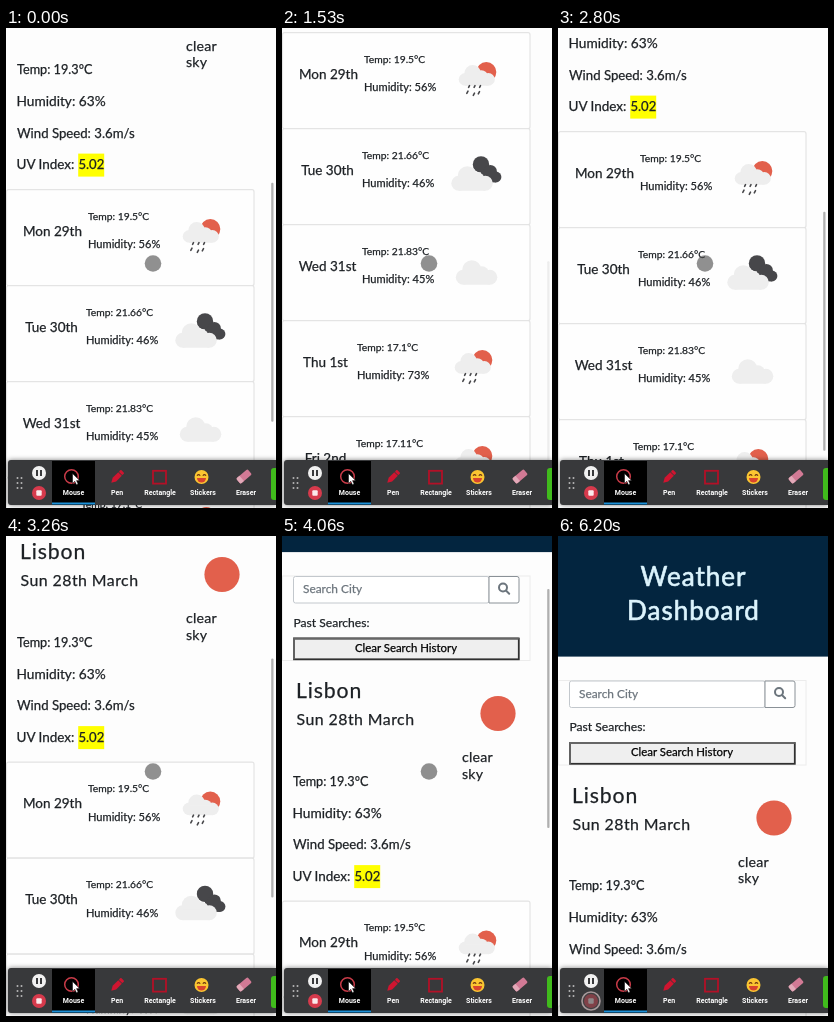
An HTML page for the animation above (6660 ms loop, 270 px wide and 480 px high).

```html
<!DOCTYPE html>
<html lang="en">
<head>
<meta charset="utf-8">
<title>Weather Dashboard</title>
<style>
  html, body { margin: 0; width: 100%; height: 100%; overflow: hidden; background: #fdfdfd; }
  svg { display: block; width: 100vw; height: 100vh; }
  text {
    font-family: Lato, "Open Sans", sans-serif; white-space: pre;
    color: #1d2125; fill: currentColor; stroke: currentColor; stroke-width: .25; stroke-linejoin: round;
  }
  .mid { text-anchor: middle; }
  .title { font-size: 26px; letter-spacing: 1px; color: #dcf4fd; stroke-width: .7; text-anchor: middle; }
  .sky { font-size: 14.2px; letter-spacing: .2px; }
  .day { font-size: 13.5px; text-anchor: middle; }
  .temp { font-size: 10.3px; }
  .hum { font-size: 11.1px; }
  .card { fill: #fefefe; stroke: #e4e4e4; stroke-width: 1.2; }
  .cloud { fill: #eeeeee; }
  .dark { fill: #47474a; }
  .sun { fill: #e2604c; }
  .rain { stroke: #47474a; stroke-width: 1.6; stroke-linecap: round; }
  #bar { filter: drop-shadow(0 0 2.5px rgba(0, 0, 0, .5)); }
  #bar text { font: 700 7px Roboto, Arial, sans-serif; color: #fff; stroke: none; text-anchor: middle; }
</style>
</head>
<body>
<svg viewBox="0 0 270 480" xmlns="http://www.w3.org/2000/svg">
  <defs>
    <g id="cloud">
      <circle cx="-5" cy="-15" r="9.5"/>
      <circle cx="5" cy="-11" r="7.5"/>
      <circle cx="-13.5" cy="-7.5" r="7.5"/>
      <circle cx="13" cy="-7.5" r="7.5"/>
      <rect x="-13.5" y="-11" width="26.5" height="11"/>
    </g>
    <!-- Weather icons, placed relative to the top left of a card -->
    <g id="shower">
      <circle class="sun" cx="204.3" cy="39.3" r="10"/>
      <use href="#cloud" class="cloud" transform="translate(195 53) scale(.87 .84)"/>
      <path class="rain" d="M187.5 53l-.9 1.7M193 53l-.9 1.7M198.5 53l-.9 1.7M186 58.5l-1.2 2.2M192.5 60.5l-1.2 2.2M197.5 59l-1.2 2.2"/>
    </g>
    <g id="overcast">
      <g class="dark">
        <circle cx="199" cy="35.7" r="8.2"/>
        <circle cx="208.3" cy="42.8" r="6.6"/>
        <circle cx="214" cy="48.3" r="5.4"/>
        <rect x="199" y="42" width="15" height="11.7"/>
      </g>
      <use href="#cloud" class="cloud" x="190.3" y="62"/>
    </g>
    <g id="cloudy"><use href="#cloud" class="cloud" x="194.8" y="60"/></g>
  </defs>

  <rect width="270" height="480" fill="#fdfdfd"/>

  <g id="page">
    <rect width="270" height="120.6" fill="#03253f"/>
    <text class="title" x="135.5" y="50">Weather</text>
    <text class="title" x="135.5" y="83.5">Dashboard</text>

    <rect x=".5" y="144.5" width="247.5" height="84.5" fill="none" stroke="#ececec"/>
    <rect x="11.5" y="145" width="195.5" height="26.5" rx="2" fill="#fff" stroke="#c3c8cd"/>
    <text x="21" y="161.8" font-size="11.9" style="color:#6c757d">Search City</text>
    <path d="M207 145h28a2 2 0 0 1 2 2v22.5a2 2 0 0 1-2 2h-28z" fill="#fff" stroke="#8a9197"/>
    <g fill="none" stroke="#6c757d" stroke-width="2" stroke-linecap="round">
      <circle cx="221" cy="156" r="4"/>
      <path d="M224.2 159.2l3 3"/>
    </g>
    <text x="11.5" y="195" font-size="12.1">Past Searches:</text>
    <rect x="12" y="207" width="224.8" height="20.8" fill="#efefef" stroke="#303030" stroke-width="1.8"/>
    <path d="M12 227.8V207H236.8" fill="none" stroke="#666" stroke-width="1.8"/>
    <text class="mid" x="124" y="220.2" font-size="11.4" style="color:#000">Clear Search History</text>

    <text x="14" y="266.5" font-size="21.2" letter-spacing=".9">Lisbon</text>
    <text x="14.5" y="293.7" font-size="15.9" letter-spacing=".45">Sun 28th March</text>
    <circle class="sun" cx="216" cy="282" r="17.6"/>
    <text class="sky" x="180" y="330.5">clear</text>
    <text class="sky" x="180" y="347">sky</text>

    <text x="11" y="354" font-size="12.7">Temp: 19.3°C</text>
    <text x="10.5" y="386" font-size="13.7">Humidity: 63%</text>
    <text x="11" y="417.8" font-size="13.2">Wind Speed: 3.6m/s</text>
    <text x="10.5" y="449.3" font-size="13.5">UV Index:</text>
    <rect x="72.2" y="433.6" width="26" height="23" fill="#ff0"/>
    <text x="72.4" y="449.3" font-size="13.1">5.02</text>
    <g id="cards"></g>
  </g>

  <rect id="thumb" x="265.2" width="2.3" height="239" rx="1" fill="#b0b0b0"/>

  <g id="bar">
    <path d="M270 432H5a3 3 0 0 0-3 3v39a3 3 0 0 0 3 3H270z" fill="#38393b"/>
    <rect x="46" y="433" width="43" height="44" fill="#000"/>
    <rect x="46" y="474.5" width="43" height="2" fill="#1c8fd6"/>
    <path d="M11.5 450v11M15.5 450v11" stroke="#b5b5b5" stroke-width="2" stroke-linecap="round" stroke-dasharray="0 5"/>
    <circle cx="33" cy="445" r="7" fill="#f1f1f1"/>
    <path d="M31 442v6M35 442v6" stroke="#38393b" stroke-width="2"/>
    <circle cx="33" cy="465" r="7" fill="#d63a4c"/>
    <rect x="30.3" y="462.3" width="5.4" height="5.4" rx="1" fill="#fbe9eb"/>

    <circle cx="65.5" cy="448.5" r="6.8" fill="none" stroke="#c93b48" stroke-width="1.5"/>
    <path d="M66.5 445.5v10l2.3-2.2 1.6 3.5 1.7-.8-1.6-3.4h3.2z" fill="#fff" stroke="#000" stroke-width=".5"/>
    <g transform="translate(111 449) rotate(45)" fill="#cf1530">
      <rect x="-2.5" y="-8" width="5" height="3" rx="1"/>
      <path d="M-2.5-4.3h5v8L0 8l-2.5-4.3z"/>
    </g>
    <rect x="147" y="442.8" width="13" height="12.8" fill="none" stroke="#b31027" stroke-width="1.8"/>
    <circle cx="195.5" cy="449" r="7" fill="#fbc531"/>
    <path d="M191 450h9a4.5 4.5 0 0 1-9 0z" fill="#d8432e"/>
    <path d="M191 447.8q1.6-2.4 3.2 0M196.8 447.8q1.6-2.4 3.2 0" fill="none" stroke="#6b3410" stroke-width="1.1"/>
    <g transform="translate(238 448.5) rotate(-40)">
      <rect x="-7.5" y="-3.5" width="15" height="7" rx="1.5" fill="#d27a95"/>
      <path d="M-3-3.5v7h-3a1.5 1.5 0 0 1-1.5-1.5v-4a1.5 1.5 0 0 1 1.5-1.5z" fill="#e3a9b8"/>
    </g>
    <path d="M270 440h-2a3 3 0 0 0-3 3v26a3 3 0 0 0 3 3h2z" fill="#40bb1c"/>
    <text x="67.5" y="466.5">Mouse</text>
    <text x="111" y="466.5">Pen</text>
    <text x="154" y="466.5">Rectangle</text>
    <text x="197" y="466.5">Stickers</text>
    <text x="240" y="466.5">Eraser</text>
  </g>

  <circle id="pointer" r="8.3" fill="#464646" fill-opacity=".6"/>
  <circle id="hover" cx="33" cy="465" r="9" fill="none" stroke="#a89a9c" stroke-width="1.6"/>
</svg>

<script>
const LOOP = 6660, FPS = 15;
const $ = id => document.getElementById(id);

// day, day centre x, temperature, humidity, text x, icon, icon shift
const days = [
  ["Mon 29th", 46.5, "19.5", 56, 82, "shower", 0],
  ["Tue 30th", 45.5, "21.66", 46, 80, "overcast", 0],
  ["Wed 31st", 45.5, "21.83", 45, 80, "cloudy", 0],
  ["Thu 1st", 43.5, "17.1", 73, 75, "shower", -4],
  ["Fri 2nd", 43.5, "17.11", 70, 74, "shower", -4]
];
$("cards").innerHTML = days.map(([day, dx, temp, hum, x, icon, shift], i) => `
  <g transform="translate(0 ${469.7 + 96 * i})">
    <rect class="card" x=".5" width="247.5" height="96" rx="2"/>
    <text class="day" x="${dx}" y="46.2">${day}</text>
    <text class="temp" x="${x}" y="30">Temp: ${temp}°C</text>
    <text class="hum" x="${x}" y="58.6">Humidity: ${hum}%</text>
    <use href="#${icon}" x="${shift}"/>
  </g>`).join("");

// Tracks hold [tick, value] points, joined by straight lines
const scroll = [[0, 308], [1, 316], [4, 352], [5, 356], [7, 356], [8, 361], [14, 440],
  [15, 456], [16, 465], [35, 465], [36, 459], [38, 436], [49, 243.5], [54, 152],
  [56, 140], [58, 140], [59, 132], [61, 104.5], [64, 20], [66, 0]];
const fade = [[19, 1], [24, 0], [35, 0], [36, 1], [68, 1], [73, 0]];
const hover = [[76, 0], [77, 1]];
const moveX = [[68, 147], [72, 74], [77, 33]];
const moveY = [[68, 235.5], [72, 351], [77, 465]];

function at(track, k) {
  if (k <= track[0][0]) return track[0][1];
  for (let i = 1; i < track.length; i++) {
    const [a, u] = track[i - 1], [b, v] = track[i];
    if (k <= b) return u + (v - u) * (k - a) / (b - a);
  }
  return track[track.length - 1][1];
}

function draw(ms) {
  const k = Math.floor((ms % LOOP + 7) * FPS / 1000);
  const y = at(scroll, k);
  $("page").setAttribute("transform", `translate(0 ${-y})`);
  $("thumb").setAttribute("y", y * 0.5 + 0.7);
  $("thumb").setAttribute("opacity", at(fade, k));
  $("pointer").setAttribute("cx", at(moveX, k));
  $("pointer").setAttribute("cy", at(moveY, k));
  $("hover").setAttribute("opacity", at(hover, k));
}

const start = performance.now();
function tick() {
  draw(performance.now() - start);
  requestAnimationFrame(tick);
}
tick();
</script>
</body>
</html>
```
